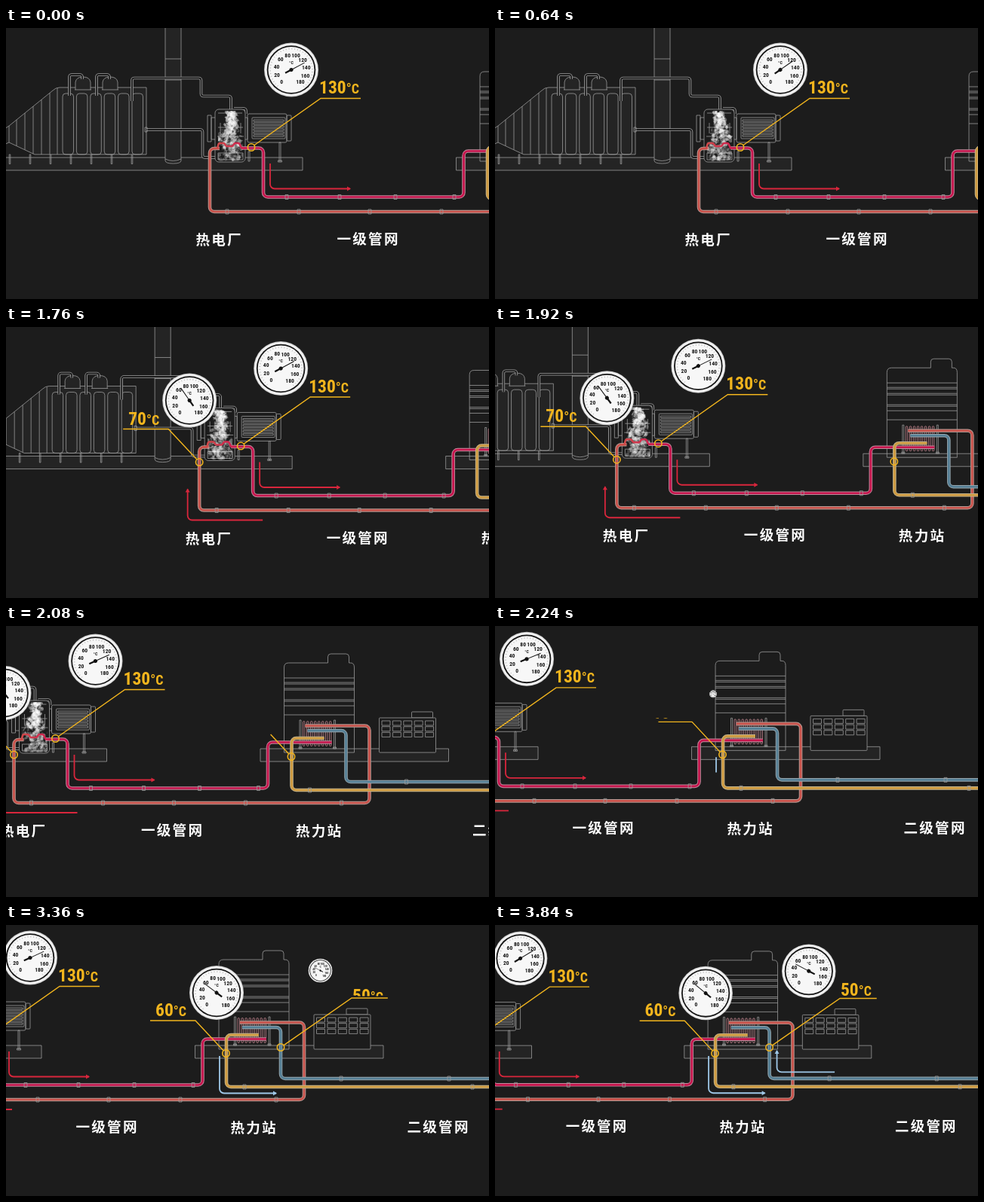
An HTML page with a canvas that plays this animation: 640 px wide and 360 px high, repeating every 4 s.

```html
<!DOCTYPE html>
<html lang="zh">
<head>
<meta charset="utf-8">
<style>
html, body { margin: 0; width: 100%; height: 100%; overflow: hidden; background: #1c1c1c; }
canvas { display: block; width: 640px; height: 360px; }
</style>
</head>
<body>
<canvas id="stage" width="640" height="360"></canvas>
<script>
const ctx = document.getElementById('stage').getContext('2d');
const LOOP = 4000, STEP = 160;
const YELLOW = '#f2b51d', RED = '#d9263c', BLUE = '#9fc8e8', GREY = '#9a9a9a';
const BACK = '#1c1c1c', SOLID = '#242424';
const DIGITS = '"Roboto Condensed", Roboto, sans-serif';

const ramp = (t, from, to) => {
  const p = Math.min(1, Math.max(0, (t - from) / (to - from)));
  return p * p * (3 - 2 * p);
};
const mix = (a, b, p) => a + (b - a) * p;

function random(seed) {
  return () => {
    seed = (seed + 0x6D2B79F5) | 0;
    let x = Math.imul(seed ^ (seed >>> 15), 1 | seed);
    x = (x + Math.imul(x ^ (x >>> 7), 61 | x)) ^ x;
    return ((x ^ (x >>> 14)) >>> 0) / 4294967296;
  };
}

// ---- drawing helpers ----
function trace(points, radius = 0) {
  ctx.beginPath();
  ctx.moveTo(...points[0]);
  for (let i = 1; i < points.length - 1; i++) ctx.arcTo(...points[i], ...points[i + 1], radius);
  ctx.lineTo(...points[points.length - 1]);
}
function stroke(color, width) {
  ctx.strokeStyle = color;
  ctx.lineWidth = width;
  ctx.stroke();
}
function partial(points, radius, progress, color, width) {
  if (progress <= 0) return;
  let length = 0;
  for (let i = 1; i < points.length; i++)
    length += Math.hypot(points[i][0] - points[i - 1][0], points[i][1] - points[i - 1][1]);
  ctx.save();
  if (progress < 1) ctx.setLineDash([length * progress, length * 2]);
  trace(points, radius);
  stroke(color, width);
  ctx.restore();
}
function disc(x, y, r, color) {
  ctx.beginPath();
  ctx.arc(x, y, r, 0, 7);
  ctx.fillStyle = color;
  ctx.fill();
}
function pipe(points, color, edge, radius = 6) {
  trace(points, radius);
  stroke(edge, 4.6);
  stroke(color, 2.7);
}
function tube(points) {
  trace(points, 3);
  stroke(GREY, 3.6);
  stroke(BACK, 1.8);
}
function outline(path, fill) {
  const shape = new Path2D(path);
  if (fill) { ctx.fillStyle = fill; ctx.fill(shape); }
  ctx.strokeStyle = GREY;
  ctx.lineWidth = .8;
  ctx.stroke(shape);
}
function box(x, y, w, h, r = 0, fill) {
  ctx.beginPath();
  ctx.roundRect(x, y, w, h, r);
  if (fill) { ctx.fillStyle = fill; ctx.fill(); }
  stroke(GREY, .8);
}
function text(string, x, y, font, color, align = 'left') {
  ctx.font = font;
  ctx.fillStyle = color;
  ctx.textAlign = align;
  ctx.fillText(string, x, y);
}

// ---- scenery ----
function boiler() {
  box(-10, 172, 403, 17, 0, SOLID);
  box(596.5, 172, 249.5, 17, 0, SOLID);
  for (let x = 5; x < 180; x += 27) box(x - .8, 168, 1.6, 12.5);
  outline('M-5 136L4 130L62 83Q66 79 71 79H186V168H38L4 152L-5 156M4 130V152M68 80V168', SOLID);
  for (let x = 14; x < 66; x += 11) {
    const top = 130 - (x - 4) * .81, bottom = Math.min(168, 152 + (x - 4) * .47);
    outline(`M${x} ${top}V${bottom}`);
  }
  for (let i = 0; i < 6; i++) box(75 + i * 18.4, 87, 14.5, 81, 4);
  for (const x of [102, 138]) {
    outline(`M${x - 10} 82V72Q${x - 9} 65 ${x} 65T${x + 10} 72V82M${x - 11} 82H${x + 11}`, SOLID);
    tube([[x - 18, 90], [x - 18, 62], [x - 1, 62], [x - 1, 68]]);
  }
  outline('M211 -2V176Q211 180 221.5 180T232 176V-2M211 41H232M211 69H232M211 134H232M211 174Q221 179 232 174', SOLID);
  tube([[167, 97], [167, 66.5], [258.5, 66.5], [258.5, 90.5], [298, 90.5], [298, 108]]);
  tube([[186, 135], [260.5, 135], [260.5, 172], [278, 172]]);
  box(184, 132, 3, 6);
}

function turbine() {
  box(267, 116, 5, 35);
  box(272, 119, 48, 29);
  box(320, 114, 52, 38, 2);
  box(372, 116, 6, 34, 1);
  box(326, 119, 44, 28, 1);
  for (let y = 122; y < 146; y += 4) box(328, y, 40, 2.2);
  box(362, 152, 2, 25);
  box(360.5, 176, 5, 2);
  box(321, 164, 2, 13);
  tube([[302, 107], [318, 107], [318, 114]]);
  box(277, 108, 40, 70, 5, BACK);
  box(281, 166, 33, 9);
  outline('M281 113H313M281 132H314M284 126V140M311 126V140M280 144H315');
}

function station() {
  outline('M628 177V64Q628 58 634 58H686V50Q686 46 690 46H710Q714 46 714 50V58H716Q721 58 721 64V177Z');
  for (const y of [78, 84, 86, 92, 94, 107, 109, 115, 127]) outline(`M628 ${y}H721`);
  box(797, 123, 28, 8, 1);
  box(754, 131, 75, 46, 1, BACK);
  for (let row = 0; row < 3; row++)
    for (let col = 0; col < 5; col++) box(757.5 + col * 14.4, 135 + row * 7.7, 11, 6);
}

function exchanger() {
  for (const x of [649.5, 695]) {
    box(x - 1, 134, 2, 37);
    box(x - 2, 170, 4, 2);
  }
  for (let x = 653; x < 692; x += 5) {
    ctx.beginPath();
    ctx.roundRect(x, 135.5, 2.4, 33, 1.2);
    stroke('#c98b95', .8);
  }
}

function pipes() {
  pipe([[283, 160], [270, 160], [270, 244], [741, 244], [741, 141.5], [656, 141.5]], '#c9524b', '#b39a94');
  pipe([[312, 159.5], [341, 159.5], [341, 224.5], [606.5, 224.5], [606.5, 163.5], [691, 163.5]], '#c6154d', '#bd8c9c');
  pipe([[1100, 216], [710, 216], [710, 148], [659, 148]], '#557f95', '#94a3aa');
  pipe([[1100, 227], [638, 227], [638, 158], [681, 158]], '#cf9a3f', '#c2b38c');
  const clamps = [[224.5, 372, 442, 516, 594], [244, 293, 388, 482, 577, 704], [216, 790, 933], [227, 662, 964]];
  for (const [y, ...places] of clamps) for (const x of places) box(x - 2, y - 3, 4, 6);
}

function steam(step) {
  const rnd = random(step * 977 + 5);
  ctx.save();
  ctx.beginPath();
  ctx.rect(281, 110, 33, 67);
  ctx.clip();
  for (let i = 0; i < 420; i++) {
    const depth = rnd();
    const spread = mix(9, 19, ramp(depth, .2, .6));
    const x = 298 + (rnd() + rnd() - 1) * spread + Math.sin(depth * 9 + step) * 1.5;
    ctx.globalAlpha = .08 + rnd() * .42 * (1 - depth * .45);
    ctx.beginPath();
    ctx.ellipse(x, 111 + depth * 65, .6 + rnd() * 2.2, .8 + rnd() * 2.6, rnd() * 3, 0, 7);
    ctx.fillStyle = '#fff';
    ctx.fill();
  }
  ctx.restore();
}

function coil() {
  trace([[274, 160], [280, 160], [282, 153], [289, 153], [292, 157], [300, 157], [303, 153], [309, 153], [312, 159.5], [318, 159.5]], 2);
  const tint = ctx.createLinearGradient(274, 0, 318, 0);
  tint.addColorStop(0, '#cf5148');
  tint.addColorStop(1, '#cf1c50');
  stroke(tint, 2.6);
}

// ---- callouts ----
function gauge(x, y, scale, degrees) {
  if (scale <= 0) return;
  ctx.save();
  ctx.translate(x, y);
  ctx.scale(scale, scale);
  disc(0, 0, 36, '#b9b9b9');
  disc(0, 0, 35.3, '#f0f0f0');
  disc(0, 0, 32.3, '#151515');
  disc(0, 0, 30.5, '#f7f7f7');
  for (let i = 0; i <= 36; i++) {
    const a = (130 + i * 7.875) * Math.PI / 180, c = Math.cos(a), s = Math.sin(a);
    trace([[c * 27, s * 27], [c * 29, s * 29]]);
    stroke('#888', .5);
  }
  for (let i = 0; i < 10; i++) {
    const a = (130 + i * 31.5) * Math.PI / 180;
    text(i * 20, 20 * Math.cos(a), 20 * Math.sin(a) + 2.7, `700 7.6px ${DIGITS}`, '#151515', 'center');
  }
  text('°C', 0, -8, `700 6px ${DIGITS}`, '#151515', 'center');
  ctx.rotate(degrees * Math.PI / 180);
  trace([[-2, 0], [20, 0]]);
  stroke('#111', 1);
  trace([[-9, 0], [0, 0]]);
  stroke('#111', 2.2);
  disc(0, 0, 2.5, '#111');
  ctx.restore();
}

function reading(value, x, baseline, rise) {
  if (rise <= 0) return;
  ctx.save();
  ctx.beginPath();
  ctx.rect(x - 5, baseline - 25, 80, 26.5);
  ctx.clip();
  const y = baseline + 18 * (1 - rise);
  text(value, x, y, `700 23.5px ${DIGITS}`, YELLOW);
  const width = ctx.measureText(value).width;
  text('°C', x + width, y, `700 18px ${DIGITS}`, YELLOW);
  ctx.restore();
}

function arrow(points, progress, color) {
  partial(points, 6, progress, color, 1.8);
  if (progress < 1) return;
  const [[ax, ay], [bx, by]] = points.slice(-2);
  ctx.save();
  ctx.translate(bx, by);
  ctx.rotate(Math.atan2(by - ay, bx - ax));
  trace([[-4, -3], [1, 0], [-4, 3]]);
  ctx.fillStyle = color;
  ctx.fill();
  ctx.restore();
}

const callouts = [
  { value: 130, start: -2000, line: [[325, 158.5], [417, 93.5], [470, 93.5]], label: [415, 87], dial: [378, 55.5],
    flow: [[350, 180], [350, 213.5], [456, 213.5]], flowStart: -1000, color: RED, needle: [332, 332] },
  { value: 70, start: 740, line: [[270, 180], [229, 136], [169, 136]], label: [176, 130], dial: [257, 98],
    flow: [[354, 257], [254.5, 257], [254.5, 216]], flowStart: 1125, color: RED, needle: [318, 234] },
  { value: 60, start: 1932, line: [[637.5, 182.5], [597, 139], [537, 139]], label: [544, 133], dial: [625, 102],
    flow: [[629, 186], [629, 235.5], [704, 235.5]], flowStart: 2143, color: BLUE, needle: [234, 219] },
  { value: 50, start: 2980, line: [[710, 174.5], [804, 109], [853, 109]], label: [805, 105], dial: [762.5, 72.5],
    flow: [[797, 207.5], [720, 207.5], [720, 179]], flowStart: 3380, color: BLUE, needle: [209, 207] }
];

function callout(c, t) {
  const since = t - c.start;
  arrow(c.flow, ramp(t, c.flowStart, c.flowStart + 380), c.color);
  const [joint, bend] = c.line;
  const size = ramp(since, -80, -20) * 4.7;
  const gap = 4.7 / Math.hypot(bend[0] - joint[0], bend[1] - joint[1]);
  const edge = joint.map((v, i) => mix(v, bend[i], gap));
  partial([edge, ...c.line.slice(1)], 0, ramp(since, 0, 400), YELLOW, 1.4);
  if (size > 0) {
    ctx.beginPath();
    ctx.arc(...joint, size, 0, 7);
    stroke(YELLOW, 1.6);
  }
  reading(c.value, ...c.label, ramp(since, 290, 470));
  const sway = c.value === 130 ? -8 * Math.sin(t / 573) : 2 * Math.sin(t / 200);
  gauge(...c.dial, ramp(since, 235, 550), mix(...c.needle, ramp(since, 540, 950)) + sway);
}

function labels() {
  ctx.letterSpacing = '2.2px';
  for (const [name, x, y] of [['热电厂', 251.5, 288], ['一级管网', 438.5, 287], ['热力站', 643.5, 287.5], ['二级管网', 877.5, 287]])
    text(name, x, y, '700 18.6px "Noto Sans CJK SC", "Noto Sans CJK", sans-serif', '#fff');
  ctx.letterSpacing = '0px';
}

// ---- camera ----
const PAN = [0, .04, .314, .75, .971, .996, 1];
function panAt(t) {
  const p = Math.min(PAN.length - 1, Math.max(0, (t - 1600) / STEP));
  const i = Math.floor(p);
  return mix(PAN[i], PAN[Math.min(i + 1, PAN.length - 1)], p - i);
}

function render() {
  const step = Math.floor(performance.now() % LOOP / STEP);
  const t = step * STEP;
  const pan = panAt(t), zoom = 1 - .006 * ramp(t, 3680, 3840);
  ctx.setTransform(1, 0, 0, 1, 0, 0);
  ctx.fontStretch = 'condensed';
  ctx.fillStyle = BACK;
  ctx.fillRect(0, 0, 640, 360);
  ctx.translate(300, 180);
  ctx.scale(zoom, zoom);
  ctx.translate(-300 - 346 * pan, -180 - 12 * pan);
  boiler();
  turbine();
  station();
  exchanger();
  pipes();
  steam(step);
  coil();
  labels();
  for (const c of callouts) callout(c, t);
  requestAnimationFrame(render);
}
render();
</script>
</body>
</html>
```
